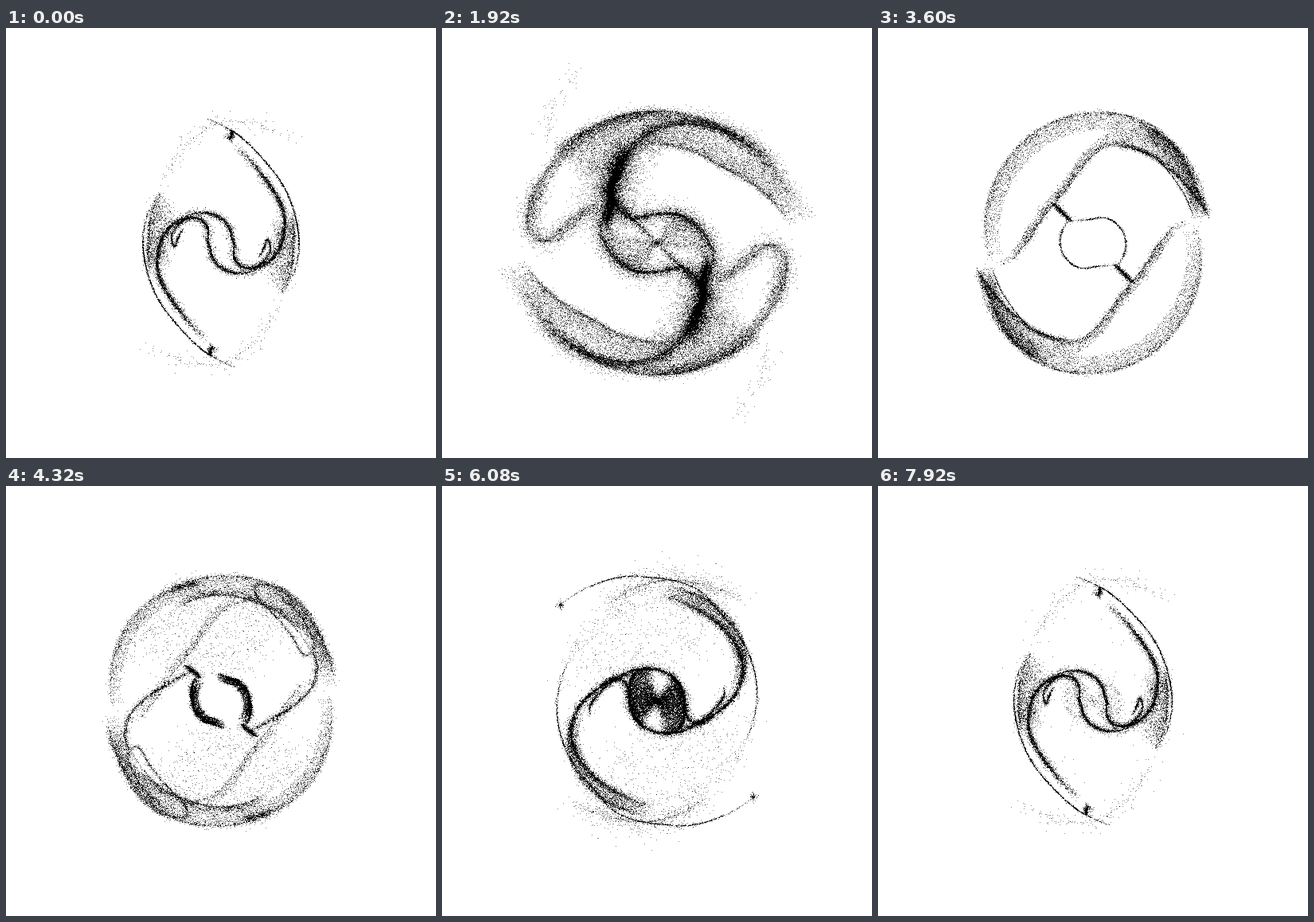
These frames come from a looping animation (540x540 px, 8 s). An HTML page with a canvas:

```html
<!DOCTYPE html>
<html lang="en">
<head>
<meta charset="utf-8">
<style>
  html, body { margin: 0; width: 100%; height: 100%; overflow: hidden; background: #fff; }
  canvas { display: block; }
</style>
</head>
<body>
<canvas id="stage" width="540" height="540"></canvas>
<script>
const SIZE = 540, MID = SIZE / 2, LOOP = 8000, STEP = 80, STEPS = 96, POOL = 1 << 15, INK = 115;
const ctx = document.getElementById('stage').getContext('2d');
const image = ctx.createImageData(SIZE, SIZE);
const pixels = image.data;
const mix = (a, b, t) => a + (b - a) * t;

let seed = 7;
function random() {
  seed = (seed + 0x6D2B79F5) | 0;
  let t = Math.imul(seed ^ (seed >>> 15), 1 | seed);
  t = (t + Math.imul(t ^ (t >>> 7), 61 | t)) ^ t;
  return ((t ^ (t >>> 14)) >>> 0) / 4294967296;
}
// Heavy-tailed offset: a crisp core with a faint mist around it
function mist() {
  const g = (random() + random() + random() - 1.5) * 2;
  return g * Math.abs(g);
}
const pool = (make) => Float32Array.from({ length: POOL }, make);
const along = pool(() => (random() + .2 * random()) / 1.2);
const across = pool(() => random() ** 2);
const offX = pool(mist), offY = pool(mist);

function spline(values, u) {
  const last = values.length - 1, k = Math.min(Math.floor(u * last), last - 1), f = u * last - k;
  const [a, b, c, d] = [k - 1, k, k + 1, k + 2].map((n) => values[Math.max(0, Math.min(last, n))]);
  return b + f / 2 * (c - a + f * (2 * a - 5 * b + 4 * c - d + f * (3 * (b - c) + d - a)));
}

// A swirl through a few (degrees, radius) points, evenly spaced along its length.
// Halo is how far dots stray towards (-) or away from (+) the centre.
function strand(count, blur, halo, ...points) {
  const angles = points.filter((_, i) => i % 2 === 0).map((a) => a * Math.PI / 180);
  const radii = points.filter((_, i) => i % 2);
  const fine = [];
  let length = 0;
  for (let i = 0; i <= 400; i++) {
    const angle = spline(angles, i / 400), radius = spline(radii, i / 400), prev = fine[i - 1];
    if (prev) length += Math.hypot(radius - prev.radius, radius * (angle - prev.angle));
    fine.push({ angle, radius, length });
  }
  const path = [];
  for (let i = 0, n = 0; i <= STEPS; i++) {
    while (n < 400 && fine[n].length < length * i / STEPS) n++;
    path.push(fine[n]);
  }
  return { count, blur, halo, path };
}

// Half of the figure; the other half is its point reflection
const poses = [
  { time: 0, parts: {
    outer: strand(950, .35, 0, -97,158, -84,141, -61,116, -28,101, 1,98, 30,100),
    arm: strand(4300, 1.3, -.03, -82,123, -56,99, -20,86, 17,68, 35,54, 50,37, 41,21, -30,16, -82,28, -113,41, -158,63),
    hook: strand(650, .8, 0, 23,50, -4,58, 12,62, 45,48),
    bead: strand(280, 1.5, 0, -84,141, -85,130),
    fan: strand(1500, 1.5, -.28, -24,97, 6,92, 40,100),
    cap: strand(150, 3, 0, -139,99, -105,135, -88,153, -52,155)
  } },
  { time: 800, parts: {
    trail: strand(260, 2, 0, -106,256, -125,237, -139,200, -139,183),
    rim: strand(5000, 3, -.13, -158,200, -139,182, -120,171, -99,162, -68,163, -33,170, 6,194),
    dash: strand(3400, 2, -.4, -152,194, -130,176, -108,164),
    spine: strand(4600, 2.4, .05, -50,156, -84,154, -105,139, -126,108, -135,90, -133,49, -98,34, -51,40, -19,51, 5,63, 38,57, 65,35),
    knot: strand(3600, 6, .05, -112,128, -131,100, -138,78),
    sweep: strand(3800, 3, .2, -119,105, -90,123, -54,137, -17,118, 16,109, 39,96),
    inner: strand(900, 3, .1, -76,82, -27,67, 25,72),
    shell: strand(2600, 6, -.1, -164,198, -174,191, -181,145, -171,122, -138,94),
    lobe: strand(900, 4, 0, -140,188, -158,184, -163,152, -140,133),
    hub: strand(2600, 1.5, -1, -80,34, -45,25, 15,20, 87,35)
  } },
  { time: 1920, parts: {
    trail: strand(70, 4, 0, -113,240, -132,203, -140,178),
    rim: strand(3400, 1.5, -.07, -178,167, -90,166, -30,168),
    dash: strand(3400, 2, -.32, -140,175, -120,168, -85,165),
    spine: strand(9500, 3.2, .05, -18,176, -62,161, -92,140, -119,98, -135,80, -135,42, -90,36, -49,45, -15,57, 12,72, 32,76, 51,83),
    knot: strand(7500, 7, .1, -106,120, -122,98, -142,72, -165,66),
    sweep: strand(3300, 1.2, .22, -104,124, -66,123, -43,129, -8,168),
    shell: strand(1800, 3, -.1, -150,172, -171,166, -179,148, -173,125, -144,86),
    bar: strand(800, 2, 0, -135,107, -135,0),
    hub: strand(1300, 1.5, -1, -75,37, -35,50, 20,65)
  } },
  { time: 3600, parts: {
    rim: strand(3700, .9, -.14, -192,130, -174,137, -142,148, -106,161, -71,166, -51,161, -12,149),
    band: strand(2300, .9, .14, -35,140, -62,130, -79,126, -108,82, -136,69, -171,76, -189,96, -194,118),
    sweep: strand(1100, .8, .03, -79,124, -60,130, -43,133, -26,139, -12,149),
    wing: strand(2700, 1.2, -.1, -70,162, -50,159, -28,148, -12,149),
    edge: strand(260, .4, 0, -56,133, -38,130, -13,130),
    bar: strand(600, 1.1, 0, -135,72, -135,38),
    hub: strand(420, .4, -.02, -135,38, -100,30, -45,38, 10,42, 47,41)
  } },
  { time: 5040, parts: {
    rim: strand(2900, 1.2, -.07, -180,141, -138,156, -102,151, -63,152, -23,141, 0,141),
    dash: strand(900, 2.5, -.03, -115,154, -100,152),
    arm: strand(1700, 1, -.03, -31,135, -13,123, 0,100, 19,69, 52,48),
    sweep: strand(1900, 1.2, .1, -153,134, -126,135, -95,126, -64,120),
    lobe: strand(1700, 1, 0, -58,162, -73,152, -66,132, -32,118, -29,132, -39,142, -65,154),
    dust: strand(1600, 4, -.7, -160,130, -95,126, -40,125),
    bar: strand(450, 1.2, 0, -135,55, -128,40),
    hub: strand(5000, 1, -.5, -66,32, -22,33, 16,35, 43,47)
  } },
  { time: 6080, parts: {
    outer: strand(1150, .5, 0, -135,171, -106,162, -92,155, -70,149, -51,135, -11,127, 30,121),
    bead: strand(110, 1.1, 0, -135,172, -135,169),
    arm: strand(5200, 1.4, .03, -89,133, -71,125, -53,123, -36,121, -20,114, -5,98, 11,76, 30,56, 23,39, -14,34, -66,36, -111,43, -148,57, -171,76),
    hook: strand(850, 1.2, 0, -13,86, -4,84, 12,70, 49,45),
    fan: strand(2500, 1.5, -.12, -85,145, -55,140, -30,128, -8,105),
    cap: strand(800, 5, 0, -119,134, -91,150, -62,158, -50,163),
    dust: strand(600, 4, -.7, -175,120, -95,130, -40,120),
    hub: strand(5500, 1.5, -1, -66,37, -14,34, 23,38, 49,45, 83,41)
  } }
];
const names = [...new Set(poses.flatMap((p) => Object.keys(p.parts)))];

function dot(x, y) {
  x = Math.floor(x);
  y = Math.floor(y);
  if (x >= 0 && y >= 0 && x < SIZE && y < SIZE) pixels[4 * (y * SIZE + x) + 3] += INK;
}

// Blends two strands; one without a partner thins out in place
function scatter(a, b, t, start) {
  const count = mix(a ? a.count : 0, b ? b.count : 0, t);
  a = a || b;
  b = b || a;
  const blur = mix(a.blur, b.blur, t), halo = mix(a.halo, b.halo, t);
  const path = a.path.map((p, i) => {
    const angle = mix(p.angle, b.path[i].angle, t), radius = mix(p.radius, b.path[i].radius, t);
    return [radius * Math.cos(angle), radius * Math.sin(angle)];
  });
  for (let i = 0; i < count; i++) {
    const n = (start + i) % POOL, s = along[n] * STEPS, k = Math.min(Math.floor(s), STEPS - 1);
    const stray = 1 + halo * across[n];
    const x = mix(path[k][0], path[k + 1][0], s - k) * stray + offX[n] * blur;
    const y = mix(path[k][1], path[k + 1][1], s - k) * stray + offY[n] * blur;
    dot(MID + x, MID + y);
    dot(MID - x, MID - y);
  }
}

function draw(time) {
  const k = poses.findLastIndex((p) => p.time <= time);
  const a = poses[k], b = poses[(k + 1) % poses.length];
  const t = (time - a.time) / ((b.time || LOOP) - a.time);
  pixels.fill(0);
  names.forEach((name, i) => {
    const p = a.parts[name], q = b.parts[name];
    if (p || q) scatter(p, q, t, i * 1777);
  });
  ctx.putImageData(image, 0, 0);
}

let shown = -1;
function tick() {
  const time = Math.floor(performance.now() % LOOP / STEP) * STEP;
  if (time !== shown) draw(shown = time);
  requestAnimationFrame(tick);
}
tick();
</script>
</body>
</html>
```
